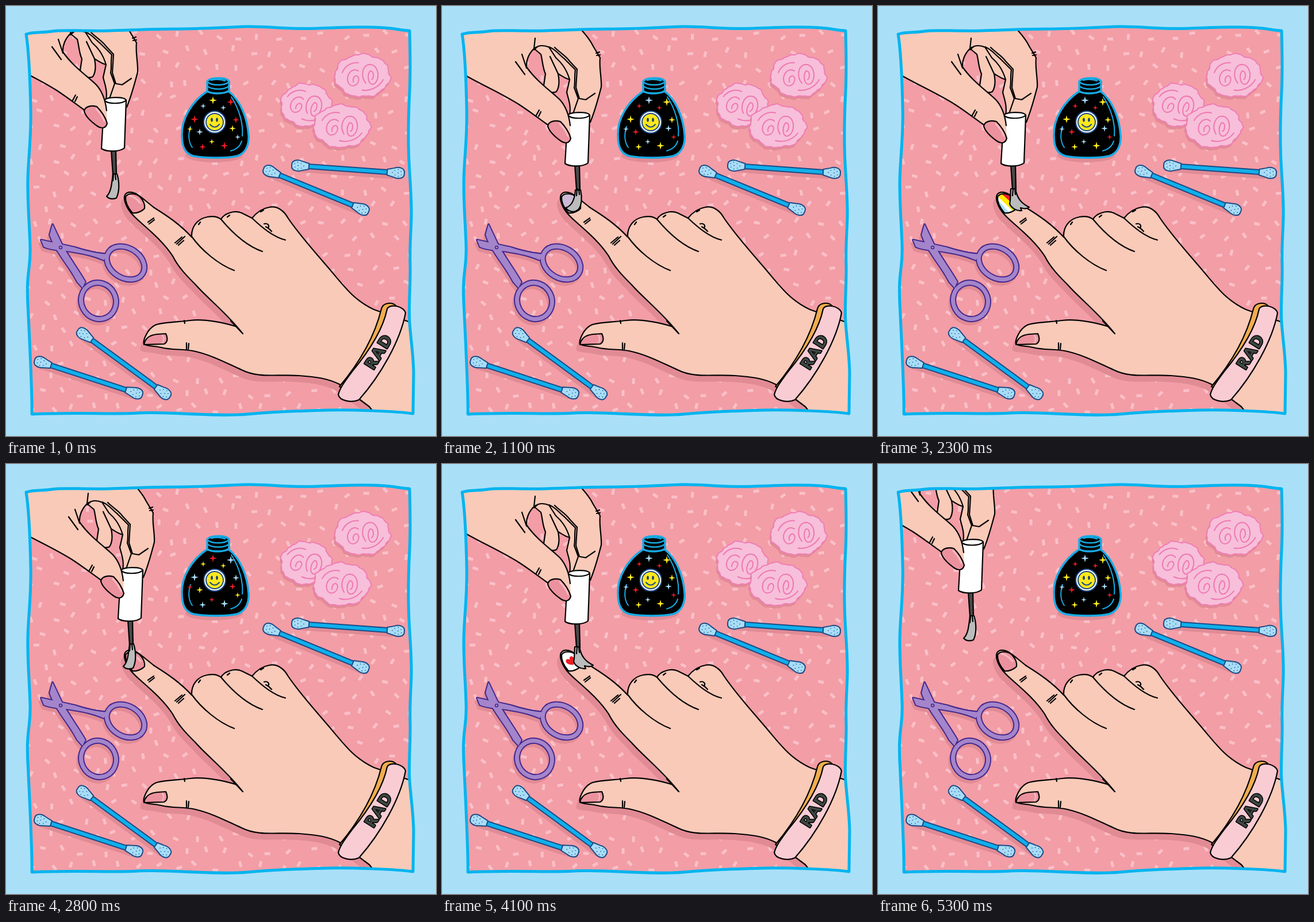
An HTML page that plays this animation: 748x748 px, repeating every 5400 ms.

```html
<!DOCTYPE html>
<html lang="en">
<head>
<meta charset="utf-8">
<title>Nail art</title>
<style>
  html, body { margin: 0; width: 100%; height: 100%; overflow: hidden; background: #aadff8; }
  svg { display: block; width: 748px; height: 748px; stroke-linecap: round; stroke-linejoin: round; }
  .ink { stroke: #000; stroke-width: 2.2; }
  .line { fill: none; }
  .skin { fill: #f9cab8; }
  .nail { fill: #ec929e; }
  .shade { fill: #e18b95; }
  .navy { stroke: #1d4a86; stroke-width: 2; }
  .curl { fill: none; stroke: #ee77b2; stroke-width: 2; }
</style>
</head>
<body>
<svg viewBox="0 0 748 748">
  <defs>
    <path id="panel" d="M35 49C50 44 64 47 80 44S130 44 180 43 250 40 290 40 370 38 410 36 480 41 540 39 600 36 640 37 680 42 702 43C703 80 704 110 702 150S699 230 701 270 706 340 705 370 702 420 703 450 700 520 702 550 709 610 709 640L708 709C680 705 600 702 560 703S480 705 420 710 280 705 230 708 130 706 45 710C46 680 41 580 38 520S43 460 42 420 37 340 38 300 44 230 43 180 40 80 35 49Z"/>
    <path id="handShape" d="M206 336C205 325 213 321 225 326C236 332 246 342 258 351C282 366 304 381 323 402C322 384 333 370 350 367C360 365 368 366 374 371C380 360 398 355 410 360L428 369C436 359 446 352 458 350C472 347 484 357 490 368C510 398 535 425 563 458C590 490 606 512 640 528L720 556V720H650L632 697L580 658C560 648 540 645 510 643C470 640 440 648 410 633C385 622 360 608 330 601C310 596 290 599 270 594C256 591 244 592 240 588C238 582 246 560 262 554C280 549 300 550 320 547C345 544 375 550 402 558L411 569C385 535 350 508 330 485C315 470 300 455 290 435C275 412 255 395 236 378C222 366 209 354 206 336Z"/>
    <path id="nailShape" d="M208 332C212 325 224 325 232 331C238 337 242 345 241 352C236 358 226 361 220 360C213 352 207 342 208 332Z"/>
    <clipPath id="inPanel"><use href="#panel"/></clipPath>
    <clipPath id="inNail"><use href="#nailShape"/></clipPath>
    <g id="tip">
      <path class="navy" fill="#a7ddf7" d="M-16 0C-17-10-5-11 2-8L14-5V5L2 8C-5 11-17 10-16 0Z"/>
      <path d="M-11-3h0M-10 3h0M-6-6h0M-5 0h0M-5 6h0M0-4h0M1 4h0M5 0h0" stroke="#1d4a86" stroke-width="1.6"/>
    </g>
    <g id="loops" fill="none">
      <ellipse cx="208" cy="447" rx="35" ry="26" transform="rotate(32 208 447)"/>
      <ellipse cx="161" cy="513" rx="30" ry="32" transform="rotate(-28 161 513)"/>
    </g>
    <g id="blades">
      <path d="M81 380L76 398C86 428 110 452 124 480L133 490L138 480C124 456 106 432 96 412Z"/>
      <path d="M61 407L66 419C82 426 100 424 118 428C138 431 154 435 170 442L177 432C154 430 138 426 120 420C98 415 84 412 61 407Z"/>
    </g>
  </defs>

  <g clip-path="url(#inPanel)">
    <use href="#panel" fill="#f39da6"/>
    <path id="sprinkles" stroke="#fac0c8" stroke-width="5" stroke-linecap="butt"/>
    <g id="swabs"></g>
    <g id="cotton"></g>
    <g id="scissors"></g>
    <circle cx="95" cy="420" r="2.5" fill="#a485cb" stroke="#44298c" stroke-width="1.5"/>

    <ellipse class="shade" cx="362" cy="260" rx="50" ry="12"/>
    <g stroke="#18abe5" stroke-width="3.5">
      <path d="M349 149C324 166 305 195 306 225C306 246 312 257 326 261C346 265 385 265 402 261C418 256 423 240 422 225C420 195 408 165 388 149Z"/>
      <path d="M350 131C354 124 382 123 388 131V147C380 154 356 153 350 148Z"/>
      <path class="line" stroke-width="2.5" d="M350 132C358 139 380 139 388 132M351 140C360 146 379 146 387 140M357 129Q369 126 381 130"/>
      <path class="line" stroke-width="2" d="M392 158C406 180 413 205 411 226M410 235C407 245 399 250 391 252M321 210C316 224 318 238 324 246"/>
    </g>
    <g id="stars"></g>
    <circle class="navy" cx="363" cy="202" r="19" fill="#fff"/>
    <circle class="navy" cx="363" cy="202" r="15" fill="#ffe81c"/>
    <g fill="#123c78"><ellipse cx="358" cy="198" rx="1.8" ry="3.5"/><ellipse cx="367" cy="198" rx="1.8" ry="3.5"/></g>
    <path class="line navy" d="M355 206Q363 215 371 206"/>

    <use href="#handShape" class="shade" transform="translate(-6 11)"/>
    <use href="#handShape" class="skin ink"/>
    <path class="line ink" d="M323 401C340 425 370 450 397 460M374 371C395 396 420 418 446 427M428 369C445 385 465 402 486 407M449 379C455 377 459 382 456 386M452 384Q458 387 462 392M247 376L257 369M249 379L258 372M294 412L306 402M297 414L311 401M300 416L309 408M391 548L412 570M310 547L311 552M314 586V598M318 587L317 597M335 380L338 376M385 367L389 364M443 358L448 355"/>
    <path class="nail ink" d="M240 589C242 578 251 572 263 571L278 570C282 578 281 585 275 588Z"/>
    <path class="line" stroke="#f6b9bc" stroke-width="2.5" d="M272 573Q277 579 272 585"/>
    <use href="#nailShape" class="nail"/>
    <path class="line" stroke="#f6bcc0" stroke-width="3" d="M214 330Q224 331 234 343"/>
    <g clip-path="url(#inNail)" id="polish">
      <path id="lilac" fill="#cdbbd5" d="M200 320h50v50h-50z"/>
      <g id="rainbow">
        <path fill="#a6def8" d="M200 320h50v50h-50z"/>
        <path stroke="#fff" stroke-width="6" d="M205 329L240 368"/>
        <path stroke="#ffe900" stroke-width="9" d="M206 323L246 361"/>
        <path stroke="#ee1c24" stroke-width="9" d="M212 318L252 354"/>
      </g>
      <g id="heart">
        <path fill="#fff" d="M200 320h50v50h-50z"/>
        <path fill="#ee1c24" transform="translate(224 343) rotate(-35)" d="M0 8C-6 3-9-1-7-5C-5-8-1-7 0-3C1-7 5-8 7-5C9-1 6 3 0 8Z"/>
      </g>
      <g id="gold"><path fill="#d5a23f" d="M200 320h50v50h-50z"/></g>
    </g>
    <use href="#nailShape" class="line ink"/>

    <path fill="#f0ad4e" class="ink" d="M653 527C656 515 672 515 678 521L664 566L600 672L580 662C612 624 640 580 653 527Z"/>
    <path fill="#f9ccd4" class="ink" d="M663 527C668 517 692 522 695 534C686 582 652 642 614 685C602 691 580 687 578 676C581 664 590 652 602 636C632 600 656 562 663 527Z"/>
    <text transform="translate(639 634) rotate(-58)" font-family="Lato, sans-serif" font-weight="900" font-size="27" letter-spacing="3" fill="#3d4743" stroke="#000" stroke-width="3" paint-order="stroke">RAD</text>

    <g id="painter">
      <path class="skin ink" d="M158 20H232L243 42C252 52 258 60 263 70L275 90C273 108 278 125 277 141C272 160 267 180 258 202L222 190C225 172 219 160 217 150L222 128C214 126 208 121 202 118C204 128 205 140 199 149C190 153 180 148 177 138L180 118C175 108 175 95 172 84L160 74Z"/>
      <path class="line ink" d="M160 76C170 66 181 67 188 72C198 76 204 85 212 91L232 111C230 124 232 132 230 142L237 161L228 187M187 73L198 90C207 98 216 108 222 128M202 118L188 88M196 72C206 82 215 86 222 96L235 110L233 142L239 161L250 163L266 152M268 82L274 80M269 86L275 85"/>
      <path class="ink" fill="#4a4a4a" d="M231 276H239L240 320H234Z"/>
      <path id="bristles" class="ink" fill="#bcbcbc" stroke-width="1.8"/>
      <path class="line ink" d="M235 318L234 330M238 319L239 328"/>
      <path class="ink" fill="#fff" d="M219 190C223 184 254 183 257 190L254 273C246 280 222 280 214 274Z"/>
      <path class="line ink" d="M219 190C224 197 250 197 257 190"/>
      <path class="skin" d="M-40 0H195L186 72L162 72L160 74C151 83 146 95 147 106C165 132 190 148 205 163C215 174 221 190 223 208L224 234C218 243 205 236 195 224L183 206C166 194 152 183 135 172C105 153 75 140 43 122L-40 74Z"/>
      <path class="line ink" d="M162 56L160 74C151 83 146 95 147 106C165 132 190 148 205 163C215 174 221 190 223 208M183 206C166 194 152 183 135 172C105 153 75 140 43 122L-40 74M128 97L144 119M139 84L147 108M160 74C168 68 176 67 187 72M169 181L164 190M172 184L168 192"/>
      <path class="nail ink" d="M184 209C185 201 196 198 206 201C215 210 221 220 224 230C222 239 214 240 207 235C197 228 187 220 184 209Z"/>
      <path class="line" stroke="#f6bcc0" stroke-width="3" d="M205 205Q215 215 219 226"/>
    </g>
  </g>
  <use href="#panel" class="line" stroke="#00b4ef" stroke-width="5"/>
</svg>

<script>
const $ = id => document.getElementById(id);

function add(parent, tag, attrs) {
  const el = document.createElementNS('http://www.w3.org/2000/svg', tag);
  for (const key in attrs) el.setAttribute(key, attrs[key]);
  return parent.appendChild(el);
}

let seed = 11;
const random = () => (seed = seed * 16807 % 2147483647) / 2147483647;

// Confetti on the table
let confetti = '';
for (let y = 52, row = 0; y < 710; y += 27, row++)
  for (let x = 46 + row % 2 * 18; x < 710; x += 36) {
    const a = random() * Math.PI, dx = 5 * Math.cos(a), dy = 5 * Math.sin(a);
    const px = x + random() * 16 - 8, py = y + random() * 14 - 7;
    confetti += `M${px - dx} ${py - dy}l${2 * dx} ${2 * dy}`;
  }
$('sprinkles').setAttribute('d', confetti);

function swab(x1, y1, x2, y2) {
  const length = Math.hypot(x2 - x1, y2 - y1);
  const angle = Math.atan2(y2 - y1, x2 - x1) * 180 / Math.PI;
  const place = `translate(${x1} ${y1}) rotate(${angle})`;
  add($('swabs'), 'path', { d: `M0 0H${length}`, stroke: '#e18b95', 'stroke-width': 10, transform: 'translate(-3 6) ' + place });
  const g = add($('swabs'), 'g', { transform: place });
  add(g, 'path', { d: `M6-4H${length - 6}V4H6Z`, fill: '#0fb0ec', class: 'navy' });
  add(g, 'use', { href: '#tip' });
  add(g, 'use', { href: '#tip', transform: `translate(${length}) rotate(180)` });
}
swab(513, 278, 677, 290);
swab(463, 289, 616, 352);
swab(138, 573, 272, 671);
swab(65, 621, 222, 672);

function cottonBall(x, y, rx, ry, turn) {
  let d = '';
  for (let i = 0; i < 120; i++) {
    const a = i * Math.PI / 60;
    const r = 1 + .03 * Math.sin(7 * a + turn) + .02 * Math.sin(12 * a + 2 * turn) + .012 * Math.sin(23 * a);
    d += (i ? 'L' : 'M') + rx * r * Math.cos(a) + ' ' + ry * r * Math.sin(a);
  }
  const place = `translate(${x} ${y})`;
  add($('cotton'), 'path', { d: d + 'Z', class: 'shade', transform: `translate(${x - 2} ${y + 5})` });
  add($('cotton'), 'path', { d: d + 'Z', fill: '#f7bfd9', stroke: '#f07db5', 'stroke-width': 2, transform: place });
  add($('cotton'), 'path', {
    class: 'curl', transform: place + ` rotate(${turn * 8 - 8})`,
    d: 'M-6-9C-16-18-30-4-26 9C-22 20-8 16-7 4C-8-5-18-1-17 9M4 14C-4 1 2-20 17-17C31-13 30 12 18 17C8 20 7 2 14-6C21-7 20 7 15 9M-34-10C-27-22-14-26-4-23M-4 25C8 29 25 25 35 12'
  });
}
cottonBall(620, 121, 48, 37, 0);
cottonBall(522, 172, 44, 37, 2);
cottonBall(584, 209, 49, 37, 1);

// Shadow, outline and fill; the loops are rings, the blades solid
for (const [color, ring, edge, shift] of [['#e18b95', 10, 3, '-3 6'], ['#44298c', 11, 4, '0 0'], ['#a485cb', 7, 0, '0 0']]) {
  const look = { fill: color, stroke: color, transform: `translate(${shift})` };
  add($('scissors'), 'use', { href: '#loops', ...look, 'stroke-width': ring });
  add($('scissors'), 'use', { href: '#blades', ...look, 'stroke-width': edge });
}

for (let i = 0; i < 150; i++)
  add($('gold'), 'circle', {
    cx: 206 + random() * 38, cy: 322 + random() * 40, r: .6 + random() * .9,
    fill: ['#f8e2a0', '#b27c25', '#fff5cf'][i % 3]
  });

// x, y, radius, first colour
const starColors = ['#ffed1f', '#ee1c24', '#a6dcf7'];
const stars = [
  [360, 164, 7, 0], [391, 167, 7, 1], [343, 174, 5, 2], [378, 177, 5, 2], [328, 197, 7, 1],
  [400, 198, 6, 1], [320, 214, 5, 0], [337, 219, 6, 2], [394, 213, 6, 0], [403, 228, 5, 2],
  [358, 236, 5, 0], [342, 245, 6, 1], [380, 243, 7, 1]
].map(([x, y, r, color]) => {
  const c = r * .2;
  const d = `M0 ${-r}L${c} ${-c} ${r} 0 ${c} ${c} 0 ${r} ${-c} ${c} ${-r} 0 ${-c} ${-c}Z`;
  return { color, el: add($('stars'), 'path', { d, transform: `translate(${x} ${y})` }) };
});

const poses = { far: [-74, -54], near: [-48, -26], close: [-32, -14], left: [-19, -5], mid: [0, 0], right: [29, 2] };
const route = ['near', 'close', 'left', 'mid', 'right', 'mid', 'left', 'mid', 'right',
  'mid', 'left', 'mid', 'right', 'mid', 'left', 'close', 'near', 'far'];
const bristles = {
  loose: 'M234 318H241C246 334 245 350 240 360C233 363 226 361 223 357C231 350 232 335 234 318Z',
  right: 'M234 318H241C243 333 247 348 245 364C241 368 236 364 235 368C229 367 227 362 231 356C234 344 233 333 234 318Z',
  trailLeft: 'M232 320H241C244 333 243 346 238 353C230 361 221 358 215 351C226 348 231 335 232 320Z',
  trailRight: 'M231 318H239C242 335 250 344 263 350C258 354 253 352 248 351L250 356C242 357 232 352 229 344C231 336 230 327 231 318Z'
};
const polishes = ['lilac', 'rainbow', 'heart', 'gold'];
const coats = ['rainbow', 'heart', 'lilac', 'rainbow', 'heart', 'gold', 'heart', 'rainbow', 'gold'];

function draw(time) {
  const step = Math.floor(time / 100) % 54;
  const phase = step % 18, beat = phase % 4, pose = route[phase];
  $('painter').setAttribute('transform', `translate(${poses[pose]})`);

  const shape = pose === 'mid' ? (beat === 3 ? 'trailLeft' : 'trailRight') : pose === 'right' ? 'right' : 'loose';
  $('bristles').setAttribute('d', bristles[shape]);

  // A stroke to the right paints the nail, the stroke back clears it
  const painted = phase >= 3 && phase <= 13 && beat !== 2;
  const coat = painted && coats[Math.floor(step / 18) * 3 + Math.floor((phase - 3) / 4)];
  for (const id of polishes) $(id).style.display = id === coat ? '' : 'none';

  for (const s of stars) s.el.setAttribute('fill', starColors[(s.color + step) % 3]);
}

const start = performance.now();
function tick() {
  draw(performance.now() - start);
  requestAnimationFrame(tick);
}
tick();
</script>
</body>
</html>
```
